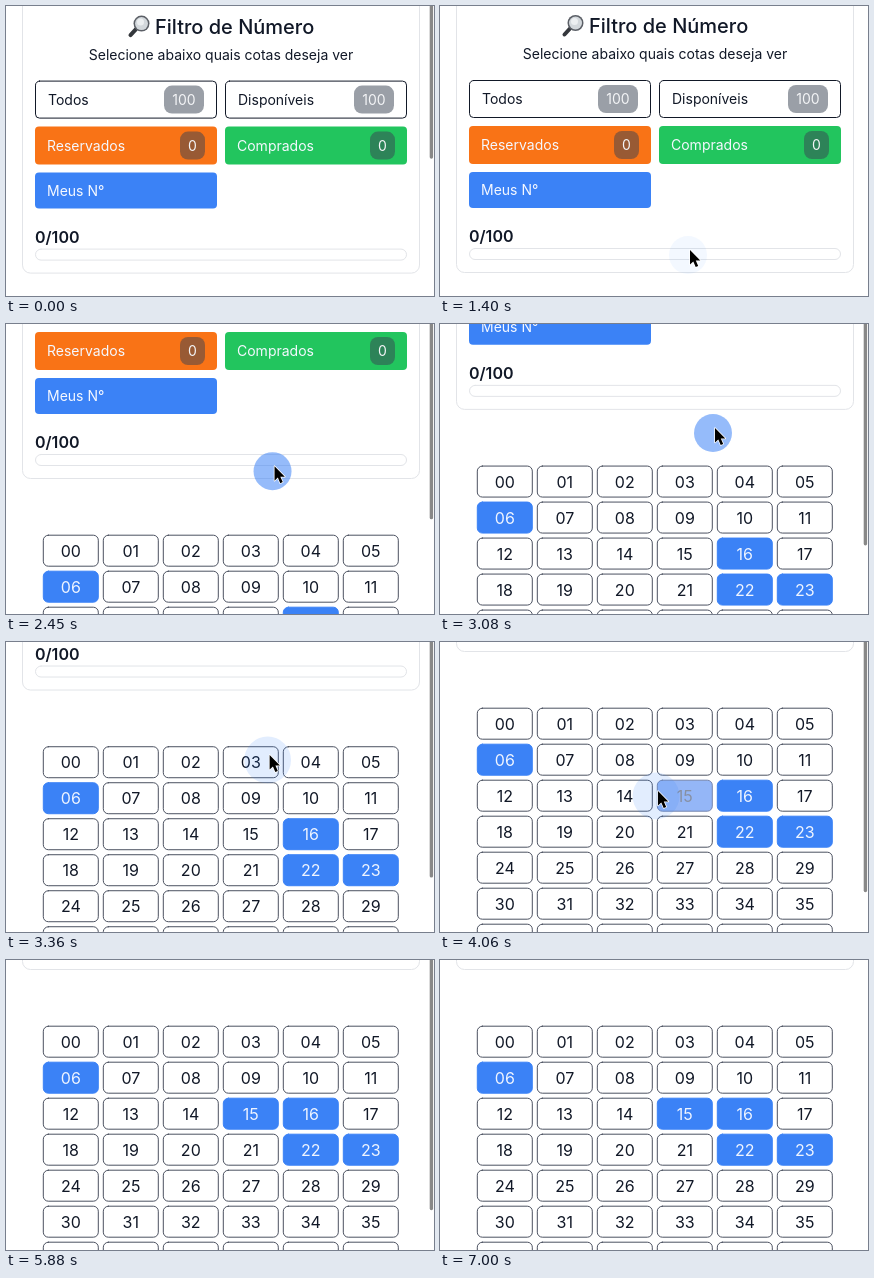
Write an HTML page with a canvas that moves like this. It is 428 px wide and 290 px high and loops after 7.07 s.

```html
<!DOCTYPE html>
<html lang="pt">
<head>
<meta charset="utf-8">
<style>
  html, body { margin: 0; width: 100%; height: 100%; overflow: hidden; background: #fff; }
  canvas { display: block; width: 428px; height: 290px; }
</style>
</head>
<body>
<canvas id="stage"></canvas>
<script>
const W = 428, H = 290, LOOP = 7070;
const INK = '#111827', BLUE = '#3b82f6', LINE = '#e2e4e8';
const canvas = document.getElementById('stage');
const ctx = canvas.getContext('2d');
const ratio = window.devicePixelRatio || 1;
canvas.width = W * ratio;
canvas.height = H * ratio;

// Key points: time, then the values to interpolate
const scrollPath = [[70, -.6], [420, 0], [1430, 0], [3080, 181], [3650, 257]];
const pointerPath = [[630, 282, 298], [1400, 250, 244], [2030, 265, 163], [3080, 275, 104],
  [4060, 218, 149], [4970, 126, 185], [5900, 96, 298]];
const presses = [[1385, 3200], [3750, 3900], [4620, 4770]];
const PICK = 3960, CONFIRM = 4300;

const ramp = (t, from, to) => Math.min(1, Math.max(0, (t - from) / (to - from)));
const linear = p => p;
const smooth = p => p * p * (3 - 2 * p);

function follow(path, t, ease) {
  const next = Math.max(1, path.findIndex(point => point[0] >= t));
  const i = t >= path.at(-1)[0] ? path.length - 1 : next;
  const a = path[i - 1], b = path[i];
  const p = ease(ramp(t, a[0], b[0]));
  return a.map((v, k) => v + (b[k] - v) * p).slice(1);
}

function box(x, y, w, h, r, fill, stroke) {
  ctx.beginPath();
  const inset = stroke ? .5 : 0;
  ctx.roundRect(x + inset, y + inset, w - 2 * inset, h - 2 * inset, r);
  ctx.fillStyle = fill;
  ctx.fill();
  if (!stroke) return;
  ctx.strokeStyle = stroke;
  ctx.lineWidth = 1;
  ctx.stroke();
}

function text(str, x, y, size, color = INK, align = 'left', weight = 400) {
  ctx.font = `${weight} ${size}px Inter, sans-serif`;
  ctx.textAlign = align;
  ctx.fillStyle = color;
  ctx.fillText(str, x, y);
}

function disc(x, y, r, color) {
  ctx.beginPath();
  ctx.arc(x, y, r, 0, 2 * Math.PI);
  ctx.fillStyle = color;
  ctx.fill();
}

function magnifier() {
  ctx.beginPath();
  ctx.moveTo(124.5, 28.5);
  ctx.lineTo(130, 22.5);
  ctx.lineCap = 'round';
  ctx.lineWidth = 4;
  ctx.strokeStyle = '#34373c';
  ctx.stroke();
  disc(135.5, 17, 8, '#5b5f66');
  disc(135.5, 17, 6.5, '#d3d8dc');
  disc(134.5, 15.5, 3.5, '#eceff1');
}

function filterButton(label, count, x, y, h, fill, badgeW) {
  const outlined = fill === '#fff';
  const mid = y + h / 2;
  box(x, y, 182, h, 4, fill, outlined && INK);
  text(label, x + (outlined ? 13 : 12), mid + 5, 14, outlined ? INK : '#f5f8ff');
  if (!count) return;
  const left = x + (outlined ? 169 : 170) - badgeW;
  box(left, mid - 14, badgeW, 28, 8, 'rgba(55,65,81,.5)');
  text(count, left + badgeW / 2, mid + 5, 14, '#f3f4f6', 'center');
}

function card() {
  box(16, -30, 398, 297, 8, '#fff', LINE);
  magnifier();
  text('Filtro de Número', 149, 27, 20, INK, 'left', 500);
  text('Selecione abaixo quais cotas deseja ver', 215, 53, 14, INK, 'center');
  filterButton('Todos', '100', 29, 74, 38, '#fff', 40);
  filterButton('Disponíveis', '100', 219, 74, 38, '#fff', 40);
  filterButton('Reservados', '0', 29, 120, 38, '#f97316', 25);
  filterButton('Comprados', '0', 219, 120, 38, '#22c55e', 25);
  filterButton('Meus N°', '', 29, 166, 36, BLUE);
  text('0/100', 29, 236, 16, INK, 'left', 600);
  box(29, 242, 372, 12, 6, '#fff', LINE);
}

const looks = {
  free: ['#fff', '#4b5160', INK],
  pending: ['#94b6f7', '#7585ad', '#8790a3'],
  chosen: [BLUE, BLUE, '#eef4ff']
};

function grid(t) {
  const picked = t < PICK ? 'free' : t < CONFIRM ? 'pending' : 'chosen';
  for (let n = 0; n < 100; n++) {
    const x = 36.8 + n % 6 * 60, y = 322.7 + Math.floor(n / 6) * 36;
    const state = n === 15 ? picked : [6, 16, 22, 23].includes(n) ? 'chosen' : 'free';
    const [fill, edge, ink] = looks[state];
    box(x, y, 56, 32, 5, fill, edge);
    text(String(n).padStart(2, '0'), x + 28, y + 22, 16, ink, 'center');
  }
}

const arrow = new Path2D('M0 0V14.5L3.3 11.4L5.7 17L8.2 15.9L5.8 10.5H10.3Z');

function pointer(t) {
  if (t < 630 || t > 5900) return;
  const [x, y] = follow(pointerPath, t, smooth);
  // A press swells as it fades out
  for (const [down, up] of presses) {
    const fade = ramp(t, up, up + 220);
    const alpha = .54 * ramp(t, down, down + 150) * (1 - fade);
    disc(x - 2, y + 5, 19 + 6 * fade, `rgba(59,130,246,${alpha})`);
  }
  ctx.save();
  ctx.translate(x, y);
  ctx.lineWidth = 1.5;
  ctx.lineJoin = 'round';
  ctx.strokeStyle = '#fff';
  ctx.stroke(arrow);
  ctx.fillStyle = '#000';
  ctx.fill(arrow);
  ctx.restore();
}

function scrollbar(t, scroll) {
  const alpha = Math.max(1 - ramp(t, 70, 420), ramp(t, 1420, 1500) - ramp(t, 6790, 7000));
  box(423.7, -20, 3.4, 173 + scroll * .378, 1.7, `rgba(136,136,136,${alpha})`);
}

function draw(now) {
  const t = now % LOOP;
  const [scroll] = follow(scrollPath, t, linear);
  ctx.setTransform(ratio, 0, 0, ratio, 0, 0);
  ctx.fillStyle = '#fff';
  ctx.fillRect(0, 0, W, H);
  ctx.save();
  ctx.translate(0, -scroll);
  card();
  grid(t);
  ctx.restore();
  scrollbar(t, scroll);
  pointer(t);
}

const start = performance.now();
function tick() {
  draw(performance.now() - start);
  requestAnimationFrame(tick);
}
tick();
</script>
</body>
</html>
```
